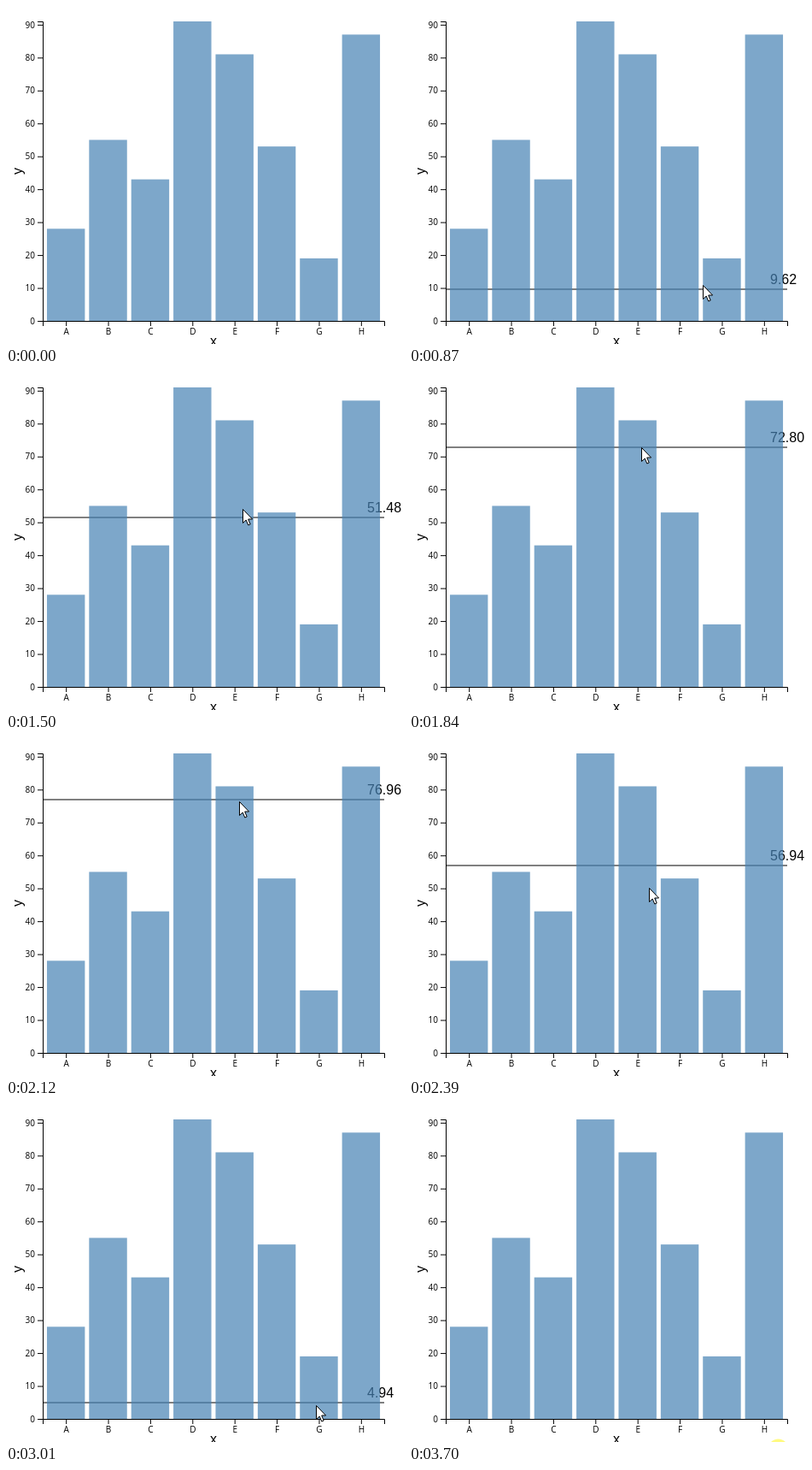
Animation, 465 px wide and 395 px high, one loop 3.77 s. Source, as an HTML page:

```html
<!DOCTYPE html>
<html lang="en">
<head>
<meta charset="utf-8">
<style>
  html, body { margin: 0; width: 100%; height: 100%; overflow: hidden; background: #fff; }
  svg { display: block; }
  text { font: 16px Arial, "Liberation Sans", sans-serif; }
  .tick text { font: 10px "Open Sans", "Noto Sans", sans-serif; }
  .axis { fill: none; stroke: #000; }
  .bar { fill: steelblue; opacity: .7; }
  .mid { text-anchor: middle; }
  .end { text-anchor: end; }
</style>
</head>
<body>
<svg width="465" height="395" viewBox="0 0 465 395">
  <g id="guide">
    <path d="M43 0H443" stroke="#000"/>
    <text id="value" x="423" y="-6"></text>
  </g>
  <g id="chart"></g>
  <text class="mid" x="243" y="397">x</text>
  <text class="mid" transform="translate(19 193) rotate(-90)">y</text>
  <circle id="spot" cx="432.5" cy="403.5" r="12" fill="#fffa80"/>
  <path id="cursor" d="M.5 .5V16.5L4.2 13L6.8 19L9.2 18L6.7 12H11.6Z" fill="#fff" stroke="#000"/>
</svg>
<script>
const LEFT = 43, WIDTH = 400, BASE = 368, HEIGHT = 350, MAX = 91;
const LOOP = 3770, START = 664, STEP = 68.5, LEAVE = 39, CLICK = 43;
const el = id => document.getElementById(id);
const yOf = v => BASE - v * HEIGHT / MAX;

function drawChart(values) {
  const step = WIDTH / (values.length + .1), band = step * .9;
  let bars = '', ticks = '', axis = 'M37 18.5H43.5V368.5H37M43.5 374V368.5H443.5V374';
  values.forEach((v, i) => {
    const x = LEFT + step * (i + .1), mid = x + band / 2 + .5;
    bars += `<rect class="bar" x="${x}" y="${yOf(v)}" width="${band}" height="${BASE - yOf(v)}"/>`;
    axis += `M${mid} 368v6`;
    ticks += `<text class="mid" x="${mid}" y="384">${String.fromCharCode(65 + i)}</text>`;
  });
  for (let v = 0; v <= 90; v += 10) {
    const y = yOf(v) + .5;
    axis += `M37 ${y}h6`;
    ticks += `<text class="end" x="34" y="${y + 3.2}">${v}</text>`;
  }
  el('chart').innerHTML = `${bars}<path class="axis" d="${axis}"/><g class="tick">${ticks}</g>`;
}

// turning points of the move: step, pointer x, pointer y, guide y
const stops = [
  [0, 376, 373, 375], [3, 344, 326, 331], [12, 277, 160, 170],
  [17, 272, 88, 88], [20, 272, 67, 67], [25, 281, 175, 149],
  [31, 349, 337, 317], [34, 363, 352, 349], [LEAVE, 382, 396, 396]
];

// slope of column c at stop i, flat where the direction turns
function slope(i, c) {
  const a = stops[Math.max(0, i - 1)], b = stops[i], d = stops[Math.min(stops.length - 1, i + 1)];
  return (b[c] - a[c]) * (d[c] - b[c]) < 0 ? 0 : (d[c] - a[c]) / (d[0] - a[0]);
}

// cubic curve through the stops
function track(k, c) {
  const i = Math.max(1, stops.findIndex(s => s[0] >= k));
  const a = stops[i - 1], b = stops[i], span = b[0] - a[0], f = (k - a[0]) / span, g = 1 - f;
  return Math.round(a[c] * g * g * (1 + 2 * f) + b[c] * f * f * (3 - 2 * f)
    + span * f * g * (slope(i - 1, c) * g - slope(i, c) * f));
}

function place(id, visible, x, y) {
  el(id).style.display = visible ? '' : 'none';
  el(id).setAttribute('transform', `translate(${x} ${y})`);
}

function render(now) {
  const k = Math.floor((now % LOOP - START) / STEP);
  const moving = k >= 0 && k < LEAVE;
  const [x, y, line] = moving ? [1, 2, 3].map(c => track(k, c)) : [0, 0, BASE];
  place('cursor', moving, x, y);
  place('guide', line < BASE, 0, line);
  place('spot', k >= CLICK, 0, 0);
  el('value').textContent = ((BASE - line) * MAX / HEIGHT).toFixed(2);
  requestAnimationFrame(render);
}

drawChart([28, 55, 43, 91, 81, 53, 19, 87]);
requestAnimationFrame(render);
</script>
</body>
</html>
```
